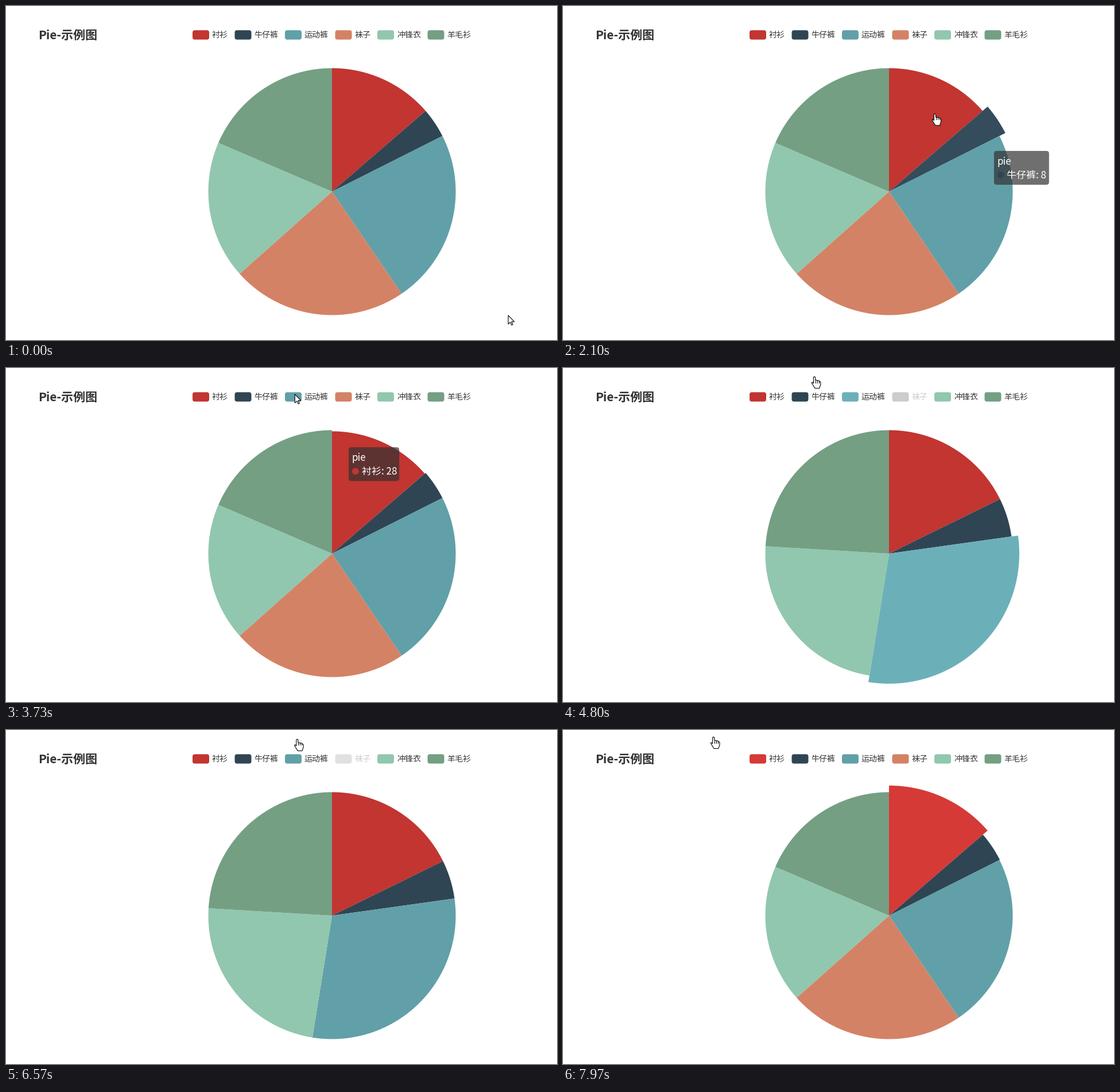
Animation of 960x583 px, one loop 8000 ms. Source, as a matplotlib script:

```python
import numpy as np
import matplotlib.pyplot as plt
from matplotlib.animation import FuncAnimation
from matplotlib.colors import to_rgb
from matplotlib.patches import Circle, FancyBboxPatch, Polygon

W, H, DPI = 960, 583, 100
LOOP, STEP, TICK = 8000, 25, 10
CX, CY, RADIUS, LIFT = 568, 324, 215.5, 11.5

NAMES = ["衬衫", "牛仔裤", "运动裤", "袜子", "冲锋衣", "羊毛衫"]
VALUES = [28, 8, 47, 47, 37, 38]
COLORS = ["#c23531", "#2f4554", "#61a0a8", "#d48265", "#91c7ae", "#749f83"]
GREY, DARK = "#cccccc", "#333333"
SPORT, SOCKS = 2, 3

# The page sees the pointer a little late and away from where it is drawn.
LAG, SHIFT = 35, np.array([75, 37])
TIP_GAP, TIP_EASE, HIDE_DELAY = 23, 70, 110
CLICKS = {4000: SOCKS, 5030: SPORT, 5930: SPORT, 6770: SOCKS}
HIGHLIGHT_LOST = 600

# Key points of the pointer: time, x, y
PATH = np.array([
    (30, 875, 540), (340, 680, 385), (870, 658, 352), (1180, 657, 350),
    (1270, 652, 270), (1580, 654, 194), (2030, 654, 194), (2740, 600, 142),
    (2870, 476, 147), (3150, 400, 185), (3500, 498, 100), (3730, 503, 47),
    (3900, 510, 17), (4250, 510, 17), (4800, 438, 15), (6230, 438, 15),
    (6570, 509, 16), (7330, 509, 16), (7970, 259, 12)]).T

ARROW = np.array([(0, 0), (0, 15.2), (3.6, 12), (5.9, 17), (8, 16),
                  (5.8, 11), (10.6, 11)])
HAND = np.array([(-1.5, 1), (0, 0), (1.5, 1), (1.8, 6), (7.5, 7),
                 (10.8, 9.5), (10.8, 14), (8.6, 20.4), (1, 20.4),
                 (-4.6, 11.4), (-4, 9.7), (-1.5, 11.6)])


def pointer(t):
    times, xs, ys = PATH
    return np.array([np.interp(t, times, xs), np.interp(t, times, ys)])


def brighten(color):
    return tuple(min(1, c * 1.1) for c in to_rgb(color))


def elastic_out(ms):
    k = ms / 300
    if k <= 0 or k >= 1:
        return float(k >= 1)
    return 1 + 2 ** (-10 * k) * np.sin((k - 0.1) * 5 * np.pi)


def legend_slots():
    x, slots = 325, []
    for name in NAMES:
        slots.append((x, x + 34 + 14 * len(name)))
        x += 45.5 + 14 * len(name)
    return slots


def build_layouts():
    """Each click on a legend item toggles its slice."""
    layouts = [(-LOOP, frozenset())]
    for t, item in CLICKS.items():
        layouts.append((t, layouts[-1][1] ^ {item}))
    return layouts


SLOTS, LAYOUTS = legend_slots(), build_layouts()


def spans(hidden):
    shown = [0 if i in hidden else v for i, v in enumerate(VALUES)]
    ends = np.cumsum(shown) / sum(shown) * 2 * np.pi
    return np.column_stack([np.r_[0, ends[:-1]], ends])


def slice_angles(t):
    """Hidden items at t and the start and end angle of every slice."""
    n = max(i for i, (start, _) in enumerate(LAYOUTS) if start <= t)
    start, hidden = LAYOUTS[n]
    before = LAYOUTS[max(n - 1, 0)][1]
    new, old = spans(hidden), spans(before)
    for i in before:
        old[i] = new[i, 0]
    k = 1 - (1 - min(1, (t - start) / 300)) ** 3
    return hidden, old + (new - old) * k


def hit(t):
    """Slice and legend item under the pointer, None where there is none."""
    x, y = pointer(t - LAG) + SHIFT
    if 40 < y < 60:
        inside = [i for i, (a, b) in enumerate(SLOTS) if a <= x <= b]
        return None, inside[0] if inside else None
    if np.hypot(x - CX, y - CY) > RADIUS:
        return None, None
    angle = np.arctan2(x - CX, CY - y) % (2 * np.pi)
    for i, (a, b) in enumerate(slice_angles(t)[1]):
        if a <= angle < b:
            return i, None
    return None, None


def simulate():
    """Play the pointer over the chart and note the state at every tick."""
    states, switches = [], [[] for _ in NAMES]
    lit = last = tip = tip_pos = None
    muted, left_at = False, 0
    for t in range(0, LOOP, TICK):
        piece, entry = hit(t)
        item = entry if piece is None else piece
        muted = muted and item == last
        muted = muted or t in CLICKS or t == HIGHLIGHT_LOST
        now_lit = None if muted else item
        if now_lit != lit:
            for i, sign in ((lit, -1), (now_lit, 1)):
                if i is not None:
                    switches[i].append((t, sign))
        if t in CLICKS:
            switches[CLICKS[t]].clear()
        lit, last = now_lit, item

        if piece is not None:
            goal = pointer(t - LAG) + SHIFT + TIP_GAP
            tip, left_at = piece, t
        elif t - left_at > HIDE_DELAY:
            tip = tip_pos = None
        if tip is not None:
            tip_pos = goal if tip_pos is None else (
                goal + (tip_pos - goal) * np.exp(-TICK / TIP_EASE))
        radii = [RADIUS + LIFT * sum(s * elastic_out(t - t0) for t0, s in sw)
                 for sw in switches]
        states.append(dict(lit=lit, entry=entry, item=item, tip=tip,
                           tip_pos=tip_pos, radii=radii))
    return states


STATES = simulate()


def sector(a, b, r):
    th = np.linspace(a, b, 90)
    arc = np.column_stack([CX + r * np.sin(th), CY - r * np.cos(th)])
    return np.vstack([(CX, CY), arc])


plt.rcParams["font.family"] = ["Noto Sans CJK JP"]
fig = plt.figure(figsize=(W / DPI, H / DPI), dpi=DPI, facecolor="white")
ax = fig.add_axes([0, 0, 1, 1])
ax.set(xlim=(0, W), ylim=(H, 0))
ax.axis("off")


def px(size):
    return size * 72 / DPI


def label(x, y, s, size, color=DARK, **kw):
    return ax.text(x, y, s, fontsize=px(size), color=color,
                   va="baseline", ha="left", **kw)


def rounded(x, y, w, h, r, color, **kw):
    style = f"round,pad=0,rounding_size={r}"
    box = FancyBboxPatch((x, y), w, h, boxstyle=style, fc=color, lw=0, **kw)
    return ax.add_patch(box)


label(56, 58, "Pie-示例图", 21, weight="bold")
icons = [rounded(a, 42.3, 29, 16.3, 4, c) for (a, _), c in zip(SLOTS, COLORS)]
captions = [label(a + 34, 54.7, s, 14) for (a, _), s in zip(SLOTS, NAMES)]
slices = [ax.add_patch(Polygon(sector(0, 1, RADIUS), fc=c, lw=0))
          for c in COLORS]

tip_box = rounded(0, 0, 105, 59, 4.7, (50 / 255,) * 3 + (0.7,), zorder=5)
tip_dot = ax.add_patch(Circle((0, 0), 5.8, lw=0, zorder=6))
tip_title = label(0, 0, "pie", 17, "white", zorder=6)
tip_text = label(0, 0, "", 17, "white", zorder=6)
tip_parts = [tip_box, tip_dot, tip_title, tip_text]

cursor = ax.add_patch(Polygon(ARROW, fc="white", ec="black", lw=px(1.1),
                              joinstyle="round", zorder=8))
fingers = [ax.plot([], [], color="black", lw=px(1), zorder=9)[0]
           for _ in range(3)]


def draw_tooltip(item, pos):
    for part in tip_parts:
        part.set_visible(item is not None)
    if item is None:
        return
    x, y = pos
    name, value = NAMES[item], str(VALUES[item])
    tip_box.set_bounds(x, y, 36.5 + 16.8 * len(name) + 9 * len(value), 59)
    tip_dot.center = (x + 11.8, y + 42)
    tip_dot.set_facecolor(COLORS[item])
    tip_title.set_position((x + 5.8, y + 24))
    tip_text.set_position((x + 22.5, y + 48))
    tip_text.set_text(f"{name}: {value}")


def draw_cursor(t, is_hand):
    x, y = pointer(t)
    cursor.set_xy((x, y) + (HAND if is_hand else ARROW))
    for k, line in enumerate(fingers):
        line.set_visible(is_hand)
        line.set_data([x + 1.8 + 3 * k] * 2, [y + 6 + k, y + 10.5])


def update(frame):
    t = frame * STEP + STEP // 2
    state = STATES[t // TICK]
    hidden, angles = slice_angles(t)
    for i, wedge in enumerate(slices):
        lit = state["lit"] == i
        wedge.set_visible(i not in hidden)
        wedge.set_xy(sector(*angles[i], state["radii"][i]))
        wedge.set_facecolor(brighten(COLORS[i]) if lit else COLORS[i])
        base = GREY if i in hidden else COLORS[i]
        lit = lit and state["entry"] == i
        icons[i].set_facecolor(brighten(base) if lit else base)
        captions[i].set_color(GREY if i in hidden else DARK)
    draw_tooltip(state["tip"], state["tip_pos"])
    draw_cursor(t, state["item"] is not None)
    return [*slices, *icons, *captions, *tip_parts, cursor, *fingers]


anim = FuncAnimation(fig, update, frames=LOOP // STEP, interval=STEP,
                     repeat=True, repeat_delay=0, blit=False)
plt.show()
```
